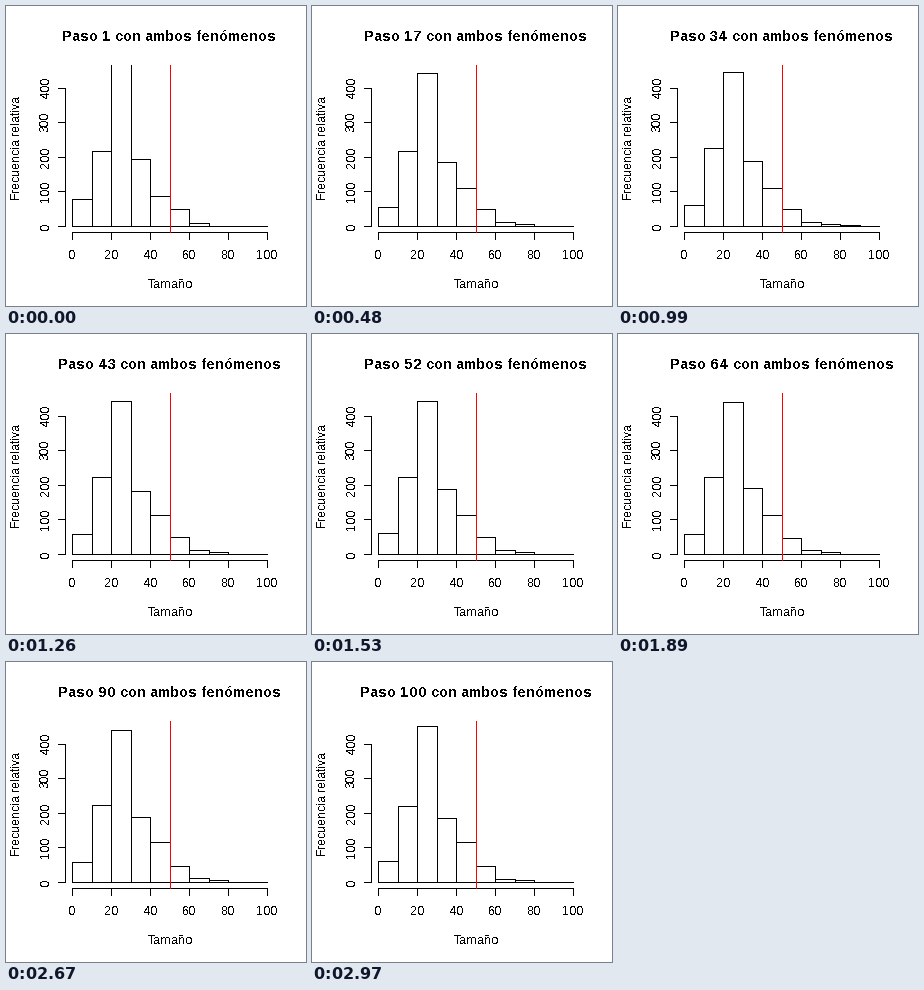
Animation, 300 px wide and 300 px high, one loop 3 s. Source, as a matplotlib script:

```python
import math

import matplotlib.pyplot as plt
import numpy as np
from matplotlib.animation import FuncAnimation

plt.rcParams.update({
    "font.family": "Liberation Sans",
    "text.antialiased": False,
    "text.hinting": "force_autohint",
    "text.hinting_factor": 1,
})

SIZE, DPI = 300, 72
STEPS, INTERVAL = 100, 30
LEFT, RIGHT, TOP, BOTTOM = 59.04, 269.28, 59.04, 226.56
X_RANGE = (-4, 104)
Y_RANGE = (-18, 468)

# Counts per bin of width 10: at the first step and once settled
START = np.array([78, 217, 480, 193, 87, 50, 8, 0, 0])
SETTLED = np.array([59, 223, 445, 187, 114, 49, 10, 5, 0])


def px(x):
    a, b = X_RANGE
    return math.floor(LEFT + (x - a) / (b - a) * (RIGHT - LEFT))


def py(y):
    a, b = Y_RANGE
    return math.floor(BOTTOM - (y - a) / (b - a) * (BOTTOM - TOP))


def simulate():
    """Relax quickly to the settled shape, then fluctuate around it."""
    rng = np.random.default_rng(12)
    t = np.arange(STEPS)[:, None]
    mean = SETTLED + (START - SETTLED) * np.exp(-t / 2)
    # a few large sizes turn up for a while
    mean[:, 8] = 3 * np.exp(-((t[:, 0] - 33) / 8) ** 2)
    noise = 0.25 * np.sqrt(mean) * rng.normal(size=mean.shape)
    return np.maximum(mean + noise * (t > 0), 0)


counts = simulate()

fig = plt.figure(figsize=(SIZE / DPI, SIZE / DPI), dpi=DPI, facecolor="white")
ax = fig.add_axes([0, 0, 1, 1])
ax.set(xlim=(0, SIZE), ylim=(SIZE, 0))
ax.axis("off")


def line(xs, ys, color="black", z=2):
    return ax.plot(xs, ys, color=color, lw=1, antialiased=False, zorder=z,
                   solid_capstyle="projecting", solid_joinstyle="miter")[0]


def label(x, y, text, size=12, **kw):
    return ax.text(x, y, text, size=size, ha="center", va="baseline",
                   rotation_mode="anchor", **kw)


axis_x, axis_y, top = math.floor(LEFT), math.floor(BOTTOM), math.floor(TOP)

line([px(0), px(100)], [axis_y] * 2)
for v in range(0, 101, 20):
    line([px(v)] * 2, [axis_y, axis_y + 7])
    label(px(v), 253, str(v))

line([axis_x] * 2, [py(0), py(400)])
for v in range(0, 401, 100):
    line([axis_x - 7, axis_x], [py(v)] * 2)
    label(43, py(v), str(v), rotation=90)

label(164, 282, "Tamaño")
label(14, 142.5, "Frecuencia relativa", rotation=90)
title = label(163.5, 35, "", size=14, weight="bold")

line([px(0), px(100)], [py(0)] * 2)
clip = plt.Rectangle((0, top), SIZE, SIZE - top, transform=ax.transData)
bars = [line([], []) for _ in SETTLED]
for bar in bars:
    bar.set_clip_path(clip)
line([px(50)] * 2, [top, axis_y], color="red", z=4)


def update(i):
    title.set_text(f"Paso {i + 1} con ambos fenómenos")
    for k, (bar, n) in enumerate(zip(bars, counts[i])):
        x0, x1, y0, y1 = px(10 * k), px(10 * k + 10), py(0), py(n)
        bar.set_data([x0, x0, x1, x1], [y0, y1, y1, y0])
    return [title, *bars]


anim = FuncAnimation(fig, update, frames=STEPS, interval=INTERVAL,
                     repeat=True, repeat_delay=0, blit=False)
plt.show()
```
